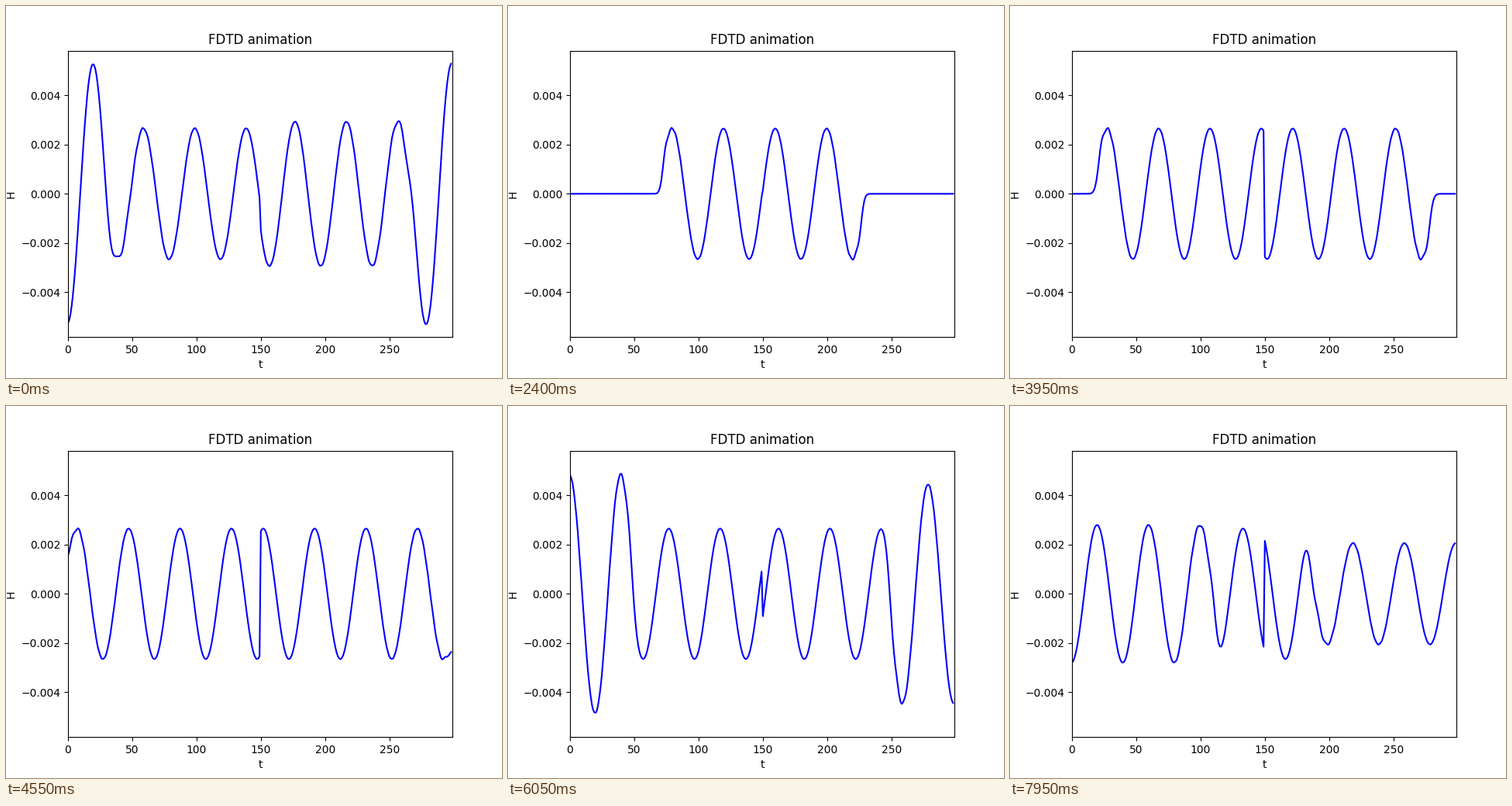
Write a matplotlib script that moves like this. It is 640 by 480 pixels and loops after 8 s.

```python
import numpy as np
import matplotlib.pyplot as plt
from matplotlib.animation import FuncAnimation

CELLS = 300            # electric field nodes
SOURCE = 150           # node driven by the sine
WAVELENGTH = 40        # in cells
COURANT = 0.8394       # c * dt / dx
IMPEDANCE = 376.73
STEPS_PER_FRAME = 2
TOTAL_STEPS = 500
FRAMES = 160


def simulate():
    """Run the 1D wave between two perfect conductors, keep H after each step."""
    e = np.zeros(CELLS)
    h = np.zeros(CELLS - 1)
    omega = 2 * np.pi * COURANT / WAVELENGTH
    history = [h.copy()]
    for n in range(1, TOTAL_STEPS + 1):
        h += COURANT / IMPEDANCE * np.diff(e)
        e[1:-1] += COURANT * IMPEDANCE * np.diff(h)
        e[SOURCE] = np.sin(omega * n)
        history.append(h.copy())
    return history


history = simulate()

fig, ax = plt.subplots(figsize=(6.4, 4.8), dpi=100)
line, = ax.plot(history[-1], color="blue", lw=1.5)
ax.set_xlim(0, CELLS - 1)
ax.set_ylim(ax.get_ylim())
ax.set_title("FDTD animation")
ax.set_xlabel("t")
ax.set_ylabel("H")


def update(frame):
    # The loop opens on the final state, then replays from the start.
    step = frame * STEPS_PER_FRAME if frame else TOTAL_STEPS
    line.set_ydata(history[step])
    return line,


anim = FuncAnimation(fig, update, frames=FRAMES, interval=50,
                     repeat=True, repeat_delay=0)
plt.show()
```
